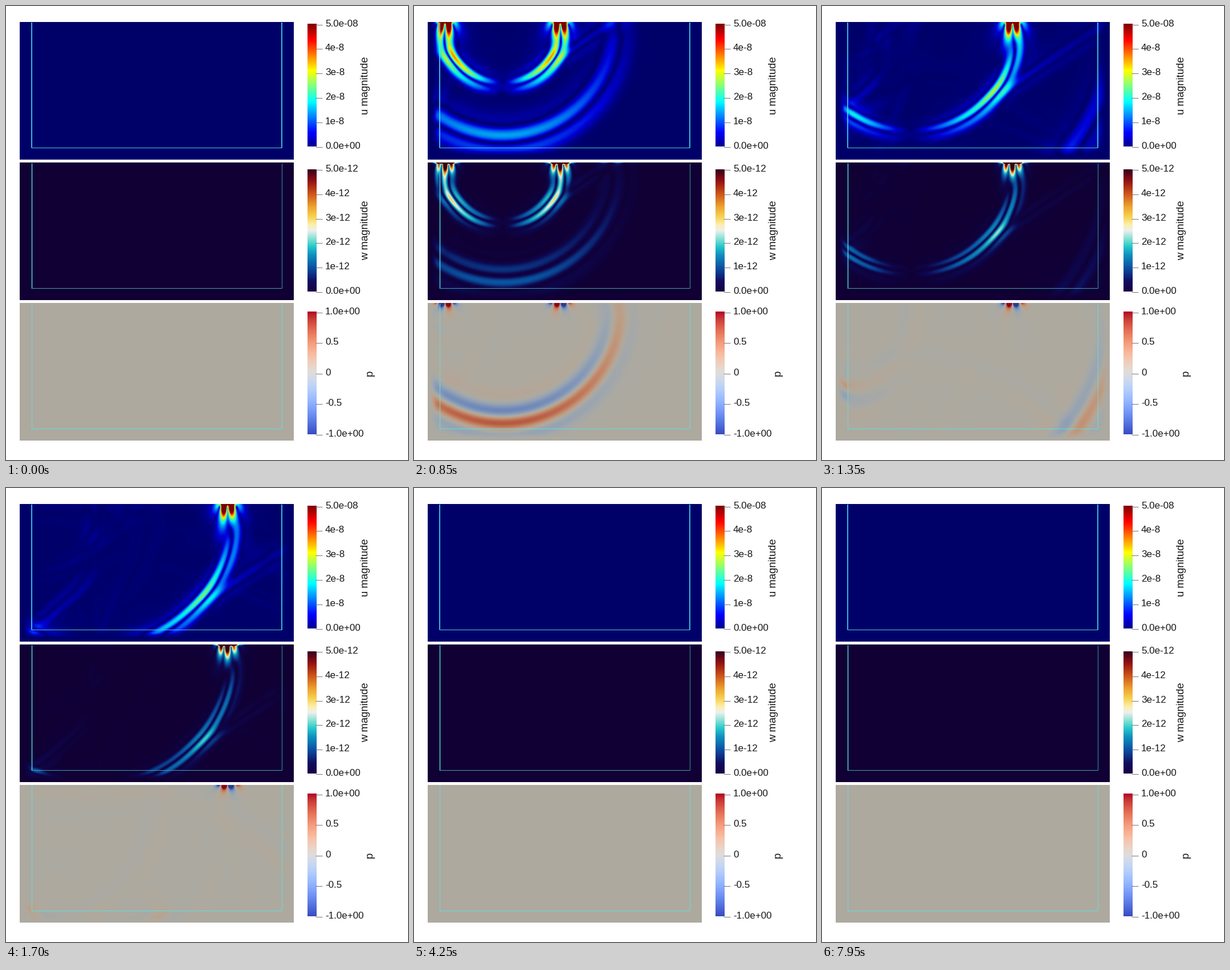
Animation, 704 px wide and 795 px high, one loop 8000 ms. Source, as a matplotlib script:

```python
import numpy as np
import matplotlib.pyplot as plt
from matplotlib.animation import FuncAnimation
from matplotlib.colors import LinearSegmentedColormap, ListedColormap

W, H, DPI = 704, 795, 100
FRAMES, INTERVAL = 160, 50
X0, X1, PANEL_H = 23.5, 503.5, 240.5
TOPS = (29, 275, 521)

# Elastic half-space, in pixels and milliseconds
CELL, NX, NZ = 1.5, 320, 160
SUB = 17
DT = INTERVAL / SUB
VP, VS = 0.314, 0.168
FREQ, DELAY = 0.005, 200
LOAD = 87
LAYER = 21
ACTIVE = 64


def ricker(t):
    a = (np.pi * FREQ * (t - DELAY)) ** 2
    return (1 - 2 * a) * np.exp(-a)


def damping():
    x = np.arange(NX) * CELL
    z = np.arange(NZ) * CELL
    dx = np.minimum(x, x[-1] - x)
    dz = z[-1] - z
    ramp = lambda d: 0.25 * np.clip(1 - d / LAYER, 0, 1) ** 3
    return np.exp(-DT * (ramp(dx)[None, :] + ramp(dz)[:, None])).astype(np.float32)


def magnitude(a, b):
    """Length of a staggered vector field at the cell centres."""
    ca, cb = a.copy(), b.copy()
    ca[:, 1:] = (a[:, 1:] + a[:, :-1]) / 2
    cb[1:] = (b[1:] + b[:-1]) / 2
    return np.hypot(ca, cb)


def simulate():
    """Staggered-grid waves from a vertical point load on a free surface."""
    new = lambda: np.zeros((NZ, NX), np.float32)
    vx, vz, sxx, szz, sxz, ux, uz, exx, ezz, dil = (new() for _ in range(10))
    mu = np.float32(VS ** 2)
    lam = np.float32(VP ** 2 - 2 * VS ** 2)
    mod = lam + 2 * mu
    c = np.float32(DT / CELL)
    dt = np.float32(DT)
    keep = damping()
    shots = [(new(), new(), new())]
    for n in range((ACTIVE - 1) * SUB):
        vx[:, :-1] += c * (sxx[:, 1:] - sxx[:, :-1])
        vx[1:] += c * (sxz[1:] - sxz[:-1])
        vx[0] += 2 * c * sxz[0]
        vz[:-1] += c * (szz[1:] - szz[:-1])
        vz[:, 1:] += c * (sxz[:, 1:] - sxz[:, :-1])
        vz[0, LOAD] += dt * np.float32(ricker(n * DT))
        vx *= keep
        vz *= keep

        exx[:, 1:] = c * (vx[:, 1:] - vx[:, :-1])
        ezz[1:] = c * (vz[1:] - vz[:-1])
        ezz[0] = -lam / mod * exx[0]
        sxx += mod * exx + lam * ezz
        szz += lam * exx + mod * ezz
        sxz[:-1, :-1] += mu * c * (vx[1:, :-1] - vx[:-1, :-1]
                                   + vz[:-1, 1:] - vz[:-1, :-1])
        for s in (sxx, szz, sxz):
            s *= keep

        ux += dt * vx
        uz += dt * vz
        dil += exx + ezz
        for s in (ux, uz, dil):
            s *= keep
        if (n + 1) % SUB == 0:
            shots.append((magnitude(ux, uz), magnitude(vx, vz), -dil))
    return shots


def scaled_fields():
    shots = simulate()
    # The pressure front straight below the load sets each scale
    rows = slice(int(95 / CELL), int(165 / CELL))
    u, w, p = (f[rows, LOAD] for f in shots[12])
    ku, kw = 0.36 / u.max(), 0.27 / w.max()
    kp = 0.85 / p[np.argmax(np.abs(p))]
    out = []
    for u, w, p in shots:
        w = w * kw
        w[0] *= 2.5
        out.append((u * ku, w, p * kp))
    return out


def ramp_map(stops):
    return LinearSegmentedColormap.from_list(
        "ramp", [(s, tuple(v / 255 for v in rgb)) for s, rgb in stops], N=512)


def shade(cmap, low, high, reach):
    """Copy of a colour map as it looks on the lit panel."""
    v = np.linspace(0, 1, 512)
    rgb = cmap(v)[:, :3]
    k = np.clip(v / reach, 0, 1)[:, None]
    return ListedColormap(np.clip(rgb * (np.array(low) * (1 - k) + np.array(high) * k), 0, 1))


JET = ramp_map([(0, (0, 0, 143)), (0.111, (0, 0, 255)), (0.365, (0, 255, 255)),
                (0.492, (128, 255, 128)), (0.619, (255, 255, 0)),
                (0.873, (255, 0, 0)), (1, (128, 0, 0))])
ICE = ramp_map([(0, (26, 0, 66)), (0.08, (18, 10, 95)), (0.2, (10, 85, 165)),
                (0.3, (15, 145, 190)), (0.37, (40, 200, 205)), (0.43, (130, 225, 210)),
                (0.5, (238, 240, 238)), (0.55, (252, 238, 170)), (0.61, (248, 212, 85)),
                (0.7, (235, 160, 45)), (0.8, (205, 85, 28)), (0.91, (145, 15, 18)),
                (1, (55, 0, 30))])
WARM = plt.get_cmap("coolwarm")
PANEL_MAPS = (shade(JET, [0.735] * 3, [0.94] * 3, 0.2),
              shade(ICE, [0.62, 0.7, 0.79], [0.95] * 3, 0.2),
              shade(WARM, [0.785, 0.77, 0.725], [0.785, 0.77, 0.725], 1))

fig = plt.figure(figsize=(W / DPI, H / DPI), dpi=DPI, facecolor="white")
ax = fig.add_axes([0, 0, 1, 1])
ax.set_axis_off()

INK = "#161616"


def label(x, y, s, px, **kw):
    ax.text(x, y, s, fontsize=px * 72 / DPI, family="Liberation Sans",
            color=INK, va="center", **kw)


def line(xs, ys, color, width):
    ax.plot(xs, ys, color=color, lw=width * 72 / DPI, solid_capstyle="butt", zorder=3)


def color_bar(cmap, top, bottom, ticks):
    ax.imshow(np.linspace(1, 0, 256)[:, None], cmap=cmap, vmin=0, vmax=1,
              extent=(528, 544, bottom, top), aspect="auto")
    for y, s in zip(np.linspace(top, bottom, len(ticks)), ticks):
        y = np.floor(y) + 0.5
        line([542, 553.5], [y, y], "#777777", 1)
        label(559, y - 0.8, s, 17)


def frame_lines(top, left, right, floor):
    base = top + 218.7
    line([44.5, 44.5], [top, base], *left)
    line([482.5, 482.5], [top, base], *right)
    line([44, 483], [base, base], *floor)


fields = scaled_fields()
blank = np.zeros((NZ, NX), np.float32)
images = [ax.imshow(blank, cmap=m, vmin=lo, vmax=1, interpolation="bicubic",
                    extent=(X0, X1, top + PANEL_H, top), aspect="auto")
          for m, lo, top in zip(PANEL_MAPS, (0, 0, -1), TOPS)]

frame_lines(TOPS[0], ("#45f5fa", 1.5), ("#45f5fa", 1.5), ("#4fc8d2", 1))
frame_lines(TOPS[1], ("#55dfe0", 1.4), ("#3f8f98", 1), ("#439fa2", 1))
frame_lines(TOPS[2], ("#66dcd8", 1), ("#66dcd8", 1), ("#66dcd8", 1))

color_bar(JET, 32, 246.5, ["5.0e-08", "4e-8", "3e-8", "2e-8", "1e-8", "0.0e+00"])
color_bar(ICE, 286.5, 500.5, ["5.0e-12", "4e-12", "3e-12", "2e-12", "1e-12", "0.0e+00"])
color_bar(WARM, 536, 750.5, ["1.0e+00", "0.5", "0", "-0.5", "-1.0e+00"])
for x, y, s in ((630, 139, "u magnitude"), (630, 393, "w magnitude"), (637, 643, "p")):
    label(x, y, s, 18.5, rotation=90, ha="center")

ax.set_xlim(0, W)
ax.set_ylim(H, 0)


def update(k):
    data = fields[k] if k < len(fields) else (blank,) * 3
    for im, d in zip(images, data):
        im.set_data(d)
    return images


anim = FuncAnimation(fig, update, frames=FRAMES, interval=INTERVAL,
                     init_func=lambda: update(0), repeat=True, repeat_delay=0)
plt.show()
```
